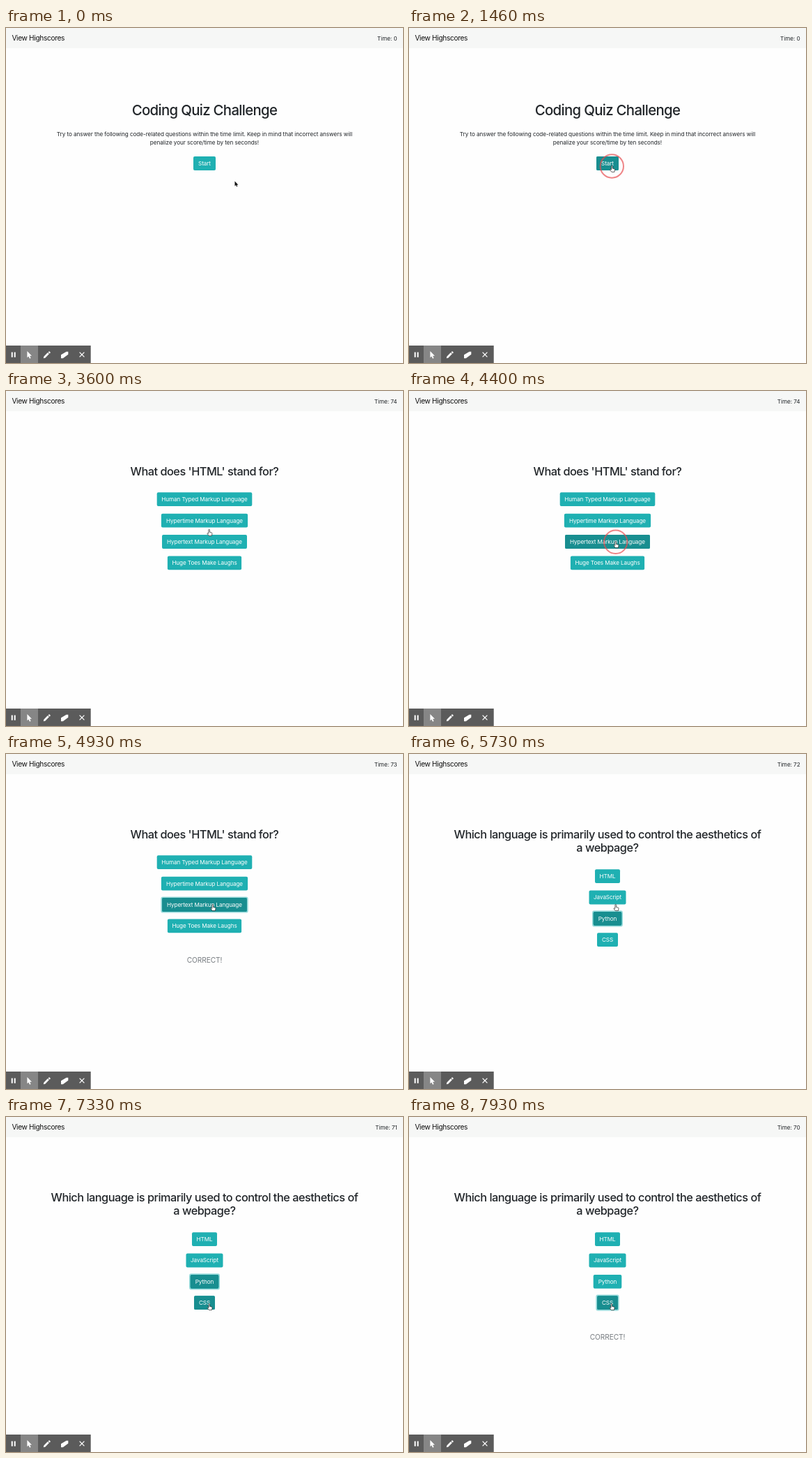
Animation of 570x480 px, one loop 8000 ms. Source, as an HTML page:

```html
<!DOCTYPE html>
<html lang="en">
<head>
<meta charset="utf-8">
<title>Coding Quiz</title>
<style>
  html, body { margin: 0; width: 100%; height: 100%; overflow: hidden; background: #fefefe; }
  svg { display: block; width: 570px; height: 480px; }
  text { font: 400 8.16px Inter, "Liberation Sans", sans-serif; font-optical-sizing: none; letter-spacing: -.007em; fill: #212529; text-anchor: middle; }
  .brand { font-size: 10.2px; letter-spacing: -.035em; text-anchor: start; fill: #111; }
  .time { text-anchor: end; }
  .title { font-size: 20.4px; font-weight: 500; letter-spacing: -.034em; }
  .question { font-size: 16.32px; font-weight: 500; letter-spacing: -.031em; }
  .label { fill: #fff; letter-spacing: -.012em; }
  .verdict { font-size: 10.2px; letter-spacing: -.012em; fill: #777c80; }
  .button { fill: #1fb0b2; }
  .dark { fill: #188e90; }
  .glow { fill: #1fb0b2; fill-opacity: .45; }
</style>
</head>
<body>
<svg id="stage" viewBox="0 0 570 480">
  <rect width="570" height="480" fill="#fefefe"/>
  <rect width="570" height="28.7" fill="#f6f7f6"/>
  <text class="brand" x="8.4" y="18.4">View Highscores</text>
  <text class="time" id="time" x="561.6" y="17.8">Time: 0</text>
  <g id="scenes"></g>
  <g id="toolbar" fill="#fff">
    <rect y="455" width="121.7" height="25" fill="#5b5b5b"/>
    <rect x="21" y="455" width="25" height="25" fill="#868686"/>
    <path d="M7.7 464.4h2v7.4h-2zM11.7 464.4h2v7.4h-2z"/>
    <path d="M30.4 463v9.3l2.1-1.9 1.5 3.4 1.6-.7-1.5-3.3h2.9z"/>
    <path d="M53.8 473.2l.5-2.5 5.6-5.6 2 2-5.6 5.6zM60.6 464.4l1-1q.5-.4 1 0l1 1q.4.5 0 1l-1 1z"/>
    <path d="M79 468.3l7.6-4.6h2.7v4l-7.5 5.6H79z"/>
    <path d="M105.6 464.6l6.8 6.8m0-6.8l-6.8 6.8" stroke="#fff" stroke-width="1.3"/>
  </g>
  <circle id="ring" r="16.7" fill="none" stroke="#e84c4f" stroke-opacity=".68" stroke-width="2"/>
  <g id="cursor" stroke-linejoin="round">
    <path id="arrow" d="M0 0V7L1.6 5.6 2.7 8 3.8 7.5 2.8 5.2H4.9Z" fill="#111" stroke="#fff" stroke-width=".7" paint-order="stroke"/>
    <path id="hand" d="M-.8 5V0a.8.8 0 0 1 1.6 0V3.1l2.5.6q1.2.3 1 1.6l-.6 3H-.4l-2.4-3.2q.6-1 2-.1Z" fill="#fff" stroke="#222" stroke-width=".7"/>
  </g>
</svg>
<script>
const LOOP = 8000, FRAME = 200 / 3, NEVER = 1e9;
const $ = id => document.getElementById(id);
const clamp = v => Math.min(1, Math.max(0, v));

function add(parent, tag, attrs, content = '') {
  const el = document.createElementNS('http://www.w3.org/2000/svg', tag);
  for (const key in attrs) el.setAttribute(key, attrs[key]);
  el.textContent = content;
  return parent.appendChild(el);
}

const write = (parent, cls, y, content) => add(parent, 'text', { class: cls, x: 285, y }, content);

function box(parent, cls, y, width, height, rx) {
  return add(parent, 'rect', { class: cls, x: 285 - width / 2, y: y - height / 2, width, height, rx });
}

// dark and glow are [on, off] times
const buttons = [];
function button(parent, label, y, width, dark = [NEVER, NEVER], glow = [NEVER, NEVER]) {
  const halo = box(parent, 'glow', y, width + 3.4, 23.2, 3.2);
  box(parent, 'button', y, width, 19.8, 2);
  const shade = box(parent, 'dark', y, width, 19.8, 2);
  write(parent, 'label', y + 2.9, label);
  buttons.push({ halo, shade, dark, glow });
}

const scenes = [];
function scene(from, to) {
  const group = add($('scenes'), 'g', {});
  scenes.push({ group, from, to });
  return group;
}

const intro = scene(0, 1590);
write(intro, 'title', 124.6, 'Coding Quiz Challenge');
write(intro, '', 154.8, 'Try to answer the following code-related questions within the time limit. Keep in mind that incorrect answers will');
write(intro, '', 167.1, 'penalize your score/time by ten seconds!');
button(intro, 'Start', 194, 32, [930, NEVER], [1520, NEVER]);

const first = scene(1590, 5000);
write(first, 'question', 120.7, "What does 'HTML' stand for?");
button(first, 'Human Typed Markup Language', 155.2, 136.6);
button(first, 'Hypertime Markup Language', 185.6, 124.2);
button(first, 'Hypertext Markup Language', 216, 122, [3750, NEVER], [4460, NEVER]);
button(first, 'Huge Toes Make Laughs', 246.3, 106.2);

const second = scene(5000, LOOP);
write(second, 'question', 120.7, 'Which language is primarily used to control the aesthetics of');
write(second, 'question', 140.3, 'a webpage?');
button(second, 'HTML', 175.1, 36);
button(second, 'JavaScript', 205.5, 53);
button(second, 'Python', 235.9, 40.6, [3750, 7530], [4460, 7530]);
button(second, 'CSS', 266.2, 30, [6025, NEVER], [7530, NEVER]);

write(scene(4530, 5000), 'verdict', 299.3, 'CORRECT!');
write(scene(7600, LOOP), 'verdict', 319.1, 'CORRECT!');

const clicks = [1460, 4400, 7530];
const path = [
  [0, 328.5, 219.5], [540, 328.5, 219.5], [1130, 291.3, 198], [3530, 291.3, 198],
  [4000, 296.7, 216.3], [5800, 296.7, 216.3], [6130, 291.8, 268.3],
  [7400, 291.8, 268.3], [7800, 290.8, 268.3], [LOOP, 290.8, 268.3]
];

function pointer(t) {
  const i = path.findIndex(p => p[0] > t);
  const [t0, x0, y0] = path[i - 1], [t1, x1, y1] = path[i];
  const u = (t - t0) / (t1 - t0), ease = u * u * (3 - 2 * u);
  return [x0 + (x1 - x0) * ease, y0 + (y1 - y0) * ease];
}

const show = (el, visible) => el.setAttribute('visibility', visible ? 'visible' : 'hidden');
const fade = (t, [on, off]) => clamp((t - on) / 150) - clamp((t - off) / 150);

function draw(t) {
  for (const s of scenes) s.group.style.display = t >= s.from && t < s.to ? '' : 'none';
  for (const b of buttons) {
    b.shade.setAttribute('opacity', fade(t, b.dark));
    b.halo.setAttribute('opacity', fade(t, b.glow));
  }
  $('time').textContent = 'Time: ' + (t < 2530 ? 0 : 75 - Math.floor((t - 2530) / 1000));

  const [x, y] = pointer(t);
  $('cursor').setAttribute('transform', `translate(${x} ${y})`);
  show($('arrow'), t < 930);
  show($('hand'), t >= 930);

  const click = clicks.find(c => t >= c && t < c + 200);
  show($('ring'), click !== undefined);
  if (click !== undefined) {
    $('ring').setAttribute('cx', x);
    $('ring').setAttribute('cy', y);
    $('ring').setAttribute('opacity', clamp(1.05 - (t - click) / 200));
  }
}

const start = performance.now();
function tick() {
  const t = (performance.now() - start) % LOOP;
  draw(Math.min(LOOP - 1, Math.floor((t + 7) / FRAME) * FRAME));
  requestAnimationFrame(tick);
}
tick();
</script>
</body>
</html>
```
